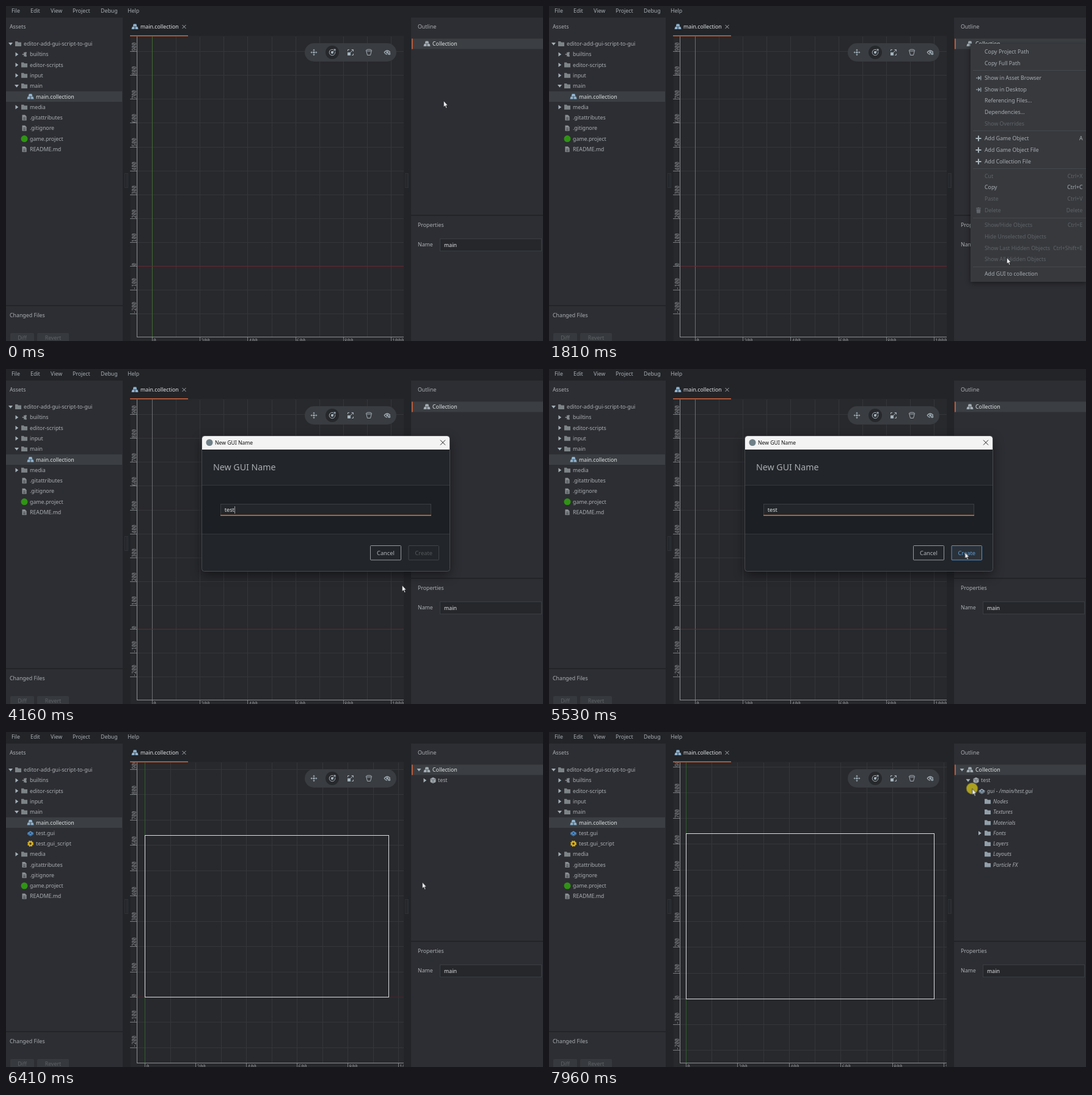
An HTML page for the animation above (8 s loop, 879 by 549 pixels).

```html
<!DOCTYPE html>
<html lang="en">
<head>
<meta charset="utf-8">
<title>Add GUI to collection</title>
<style>
@property --u { syntax: "<number>"; inherits: true; initial-value: 39.1; }
@property --x0 { syntax: "<number>"; inherits: true; initial-value: 239.5; }
@property --y0 { syntax: "<number>"; inherits: true; initial-value: 426.5; }
html, body { margin: 0; width: 100%; height: 100%; overflow: hidden; background: #222428; }
svg { display: block; width: 879px; height: 549px; }
text { font: 8.8px "Noto Sans", "Open Sans", sans-serif; fill: #a9aeb3; white-space: pre; }
.hi { fill: #e2e4e6; }
.off { fill: #606468; }
.it { font-style: italic; }
.mid { text-anchor: middle; }
.end { text-anchor: end; }
.line { fill: none; stroke: #a3afb7; }
.crisp { shape-rendering: crispEdges; }
.gx { transform: translateX(calc((var(--x0) + var(--u) * var(--n)) * 1px)); }
.gy { transform: translateY(calc((var(--y0) - var(--u) * var(--n)) * 1px)); }
.ruler text { font: 8px "Noto Sans Mono", "DejaVu Sans Mono", monospace; fill: #8d9094; }
#hover { mix-blend-mode: color-dodge; }
#bounds {
  x: calc(var(--x0) * 1px); y: calc((var(--y0) - var(--u) * 6.4) * 1px);
  width: calc(var(--u) * 9.6px); height: calc(var(--u) * 6.4px);
  fill: none; stroke: #dcdedf;
}
</style>
</head>
<body>
<svg id="stage" viewBox="0 0 879 549"></svg>
<script>
const LOOP = 8000;
let css = "";

// Registers keyframes [ms, declarations] on an element id.
function animate(id, keys, timing = "step-end") {
  const body = keys.map(([ms, rule]) => `${ms / LOOP * 100}% { ${rule} }`).join(" ");
  css += `@keyframes ${id} { ${body} }\n#${id} { animation: ${id} ${LOOP}ms ${timing} infinite; }\n`;
}

// Shows an element during each [from, to] span.
function show(id, ...spans) {
  const keys = spans.flatMap(([a, b]) => [[a, "visibility: visible"], [b, "visibility: hidden"]]);
  animate(id, [[0, "visibility: hidden"], ...keys.filter(k => k[0] < LOOP)]);
}

const rect = (x, y, w, h, fill, more = "") =>
  `<rect x="${x}" y="${y}" width="${w}" height="${h}" fill="${fill}" ${more}/>`;
const text = (x, y, s, cls = "") => `<text x="${x}" y="${y + 3.1}" class="${cls}">${s}</text>`;
const path = (d, fill, more = "") => `<path d="${d}" fill="${fill}" ${more}/>`;
const at = (x, y, s) => `<g transform="translate(${x} ${y})">${s}</g>`;
const group = (id, s) => `<g id="${id}">${s}</g>`;
const range = (a, b) => Array.from({ length: b - a + 1 }, (_, i) => a + i);
const row = i => 62 + i * 17.28;

const icon = {
  folder: (x, y, c = "#7d8488") => at(x, y, path("M-5-4h4l1 1.500h5v6.500h-10z", c)),
  stack: (x, y, c = "#8fb3cf") => at(x, y,
    path("M-2.300-4.500h4.600l1 4h-6.600zM-4.500 0h4l0 4h-5zM.500 0h4l1 4h-5z", c)),
  file: (x, y) => at(x, y, path("M-3.500-4.500h4.500l2.500 2.500v6.500h-7z", "#8b9195") +
    path("M-2-.500h4M-2 1.500h4M-2 3h4", "none", 'stroke="#2d2e33" stroke-width=".7"')),
  puzzle: (x, y) => at(x, y, `<g transform="rotate(45)">` + rect(-2.6, -2.6, 5.2, 5.2, "#868d91") +
    icon.dot(0, -3.4, 1.5, "#868d91") + icon.dot(3.4, 0, 1.5, "#868d91") +
    icon.dot(-2.4, 0, 1.1, "#2d2e33") + icon.dot(0, 2.4, 1.1, "#2d2e33") + "</g>"),
  dot: (x, y, r, c) => `<circle cx="${x}" cy="${y}" r="${r}" fill="${c}"/>`,
  gui: (x, y, c) => at(x, y, path("M-5.500 0L0-3.500 5.500 0 0 3.500z", c) +
    path("M-5 1.500L0 4.600 5 1.500", "none", `stroke="${c}"`) + path("M-1.800 0L0-1.200 1.800 0 0 1.200z", "#2d3a48")),
  gear: (x, y) => at(x, y, `<circle r="3.700" fill="none" stroke="#dcb520" stroke-width="2.600" stroke-dasharray="1.900 1"/>
    <circle r="2.700" fill="none" stroke="#dcb520" stroke-width="2"/>`),
  cube: (x, y) => at(x, y, path("M0-5L4.500-2.700V2.600L0 5-4.500 2.600V-2.700z", "#9da4a9") +
    path("M-4.300-2.600L0-.300 4.300-2.600M0-.300V5", "none", 'stroke="#5c6267" stroke-width=".8"')),
  right: (x, y) => at(x, y, path("M-2-3.500L2.700 0-2 3.500z", "#a3b1b8")),
  down: (x, y) => at(x, y, path("M-3.500-2h7L0 2.500z", "#a3b1b8")),
};

function assets() {
  const item = (i, x, pic, name, cls) => pic(x - 9, row(i)) + text(x, row(i), name, cls);
  const dir = (i, name, arrow = icon.right) => arrow(17.5, row(i)) + item(i, 39, icon.folder, name);
  const blueGui = (x, y) => icon.gui(x, y, "#4f8fce");
  const green = (x, y) => icon.dot(x, y, 5.5, "#2f9414");
  return rect(0, 140, 190, 17, "#3b3f43") +
    icon.down(7.5, row(0)) + item(0, 29, icon.folder, "editor-add-gui-script-to-gui") +
    icon.right(17.5, row(1)) + item(1, 39, icon.puzzle, "builtins") +
    dir(2, "editor-scripts") + dir(3, "input") + dir(4, "main", icon.down) +
    item(5, 49, icon.stack, "main.collection", "hi") +
    group("newFiles", item(6, 49, blueGui, "test.gui") + item(7, 49, icon.gear, "test.gui_script")) +
    group("lowerFiles", dir(6, "media") + item(7, 39, icon.file, ".gitattributes") +
      item(8, 39, icon.file, ".gitignore") + item(9, 39, green, "game.project") +
      item(10, 39, icon.file, "README.md"));
}

function panels() {
  const panel = (x, y, w, h) => rect(x, y, w, h, "#2d2e33");
  const grip = x => path(`M${x} 274.500h5v23h-5zM${x + 2.500} 275v22`, "none", 'stroke="#2f3237" class="crisp"');
  const menus = [[9, "File"], [40, "Edit"], [73, "View"], [109, "Project"], [155, "Debug"], [199, "Help"]];
  return panel(0, 19, 191, 471) + panel(0, 492, 191, 57) + panel(663, 19, 216, 323) + panel(663, 344, 216, 205) +
    menus.map(([x, s]) => text(x, 8, s)).join("") +
    text(6, 34, "Assets") + text(6, 507, "Changed Files") + text(674, 34, "Outline") + text(674, 359, "Properties") +
    rect(7, 536, 39, 16, "#36393d", 'rx="2"') + text(26.5, 544, "Diff", "mid off") +
    rect(51, 536, 52, 16, "#36393d", 'rx="2"') + text(77, 544, "Revert", "mid off") +
    text(674, 391, "Name") + rect(710.5, 381.5, 166, 20, "#25272b", 'stroke="#3a3d42"') + text(717, 392, "main", "hi") +
    icon.stack(211, 34) + text(220, 34, "main.collection", "hi") +
    path("M288.500 31l6 6m0-6l-6 6", "none", 'stroke="#a9adb2"') + grip(194.5) + grip(653.5);
}

function viewport() {
  const line = (cls, n, d, id, stroke) =>
    `<path ${id ? `id="${id}"` : ""} class="${cls} crisp" style="--n:${n}" d="${d}" stroke="${stroke}"/>`;
  const V = "M0 50V542", H = "M215 0H651";
  const xs = range(-1, 11).map(n => line("gx", n, V, "", "#34363a")).join("");
  const ys = range(-2, 10).map(n => line("gy", n, H, "", "#34363a")).join("");
  const left = range(-2, 10).map(n => `<g class="gy" style="--n:${n}"><path class="crisp" d="M203 0h11" stroke="#797c80"/>
    <text transform="translate(213 -.5) rotate(-90)">${n * 100}</text></g>`).join("");
  const base = range(0, 5).map(n => `<g class="gx" style="--n:${n * 2}"><path class="crisp" d="M0 542v7" stroke="#797c80"/>
    <text x="1.500" y="551.500">${n * 200}</text></g>`).join("");
  return `<clipPath id="area"><path d="M215 50H651V542H215z"/></clipPath>
    <clipPath id="side"><path d="M203 50H215V543H203z"/></clipPath>
    <clipPath id="foot"><path d="M203 542H651V549H203z"/></clipPath>` +
    rect(204, 49, 447, 500, "#28292d") + rect(203, 48, 95, 1.6, "#cb623b") +
    group("view", `<g clip-path="url(#area)">${xs}${ys}` +
      line("gx", 0, V, "axisY", "#6a6d70") + line("gy", 0, H, "axisX", "#662730") +
      `<rect id="bounds" class="crisp"/></g>
      <g class="ruler" clip-path="url(#side)">${left}</g><g class="ruler" clip-path="url(#foot)">${base}</g>`) +
    path("M214.500 50V542.500H651", "none", 'stroke="#8b8e91" class="crisp"');
}

function toolbar() {
  const c = "#a3b3bc";
  return rect(489, 61, 150, 30, "#393c40", 'rx="15"') + icon.dot(534, 76, 11, "#26282b") +
    at(504, 76, path("M0-5.500l1.800 2.300h-3.600zM0 5.500l1.800-2.300h-3.600zM-5.500 0l2.300-1.800v3.600zM5.500 0l-2.300-1.800v3.600z", c) +
      path("M0-3V3M-3 0H3", "none", `stroke="${c}" stroke-width=".8"`) + icon.dot(0, 0, 1.3, c)) +
    at(534, 76, `<path class="line" d="M2-4.300A4.800 4.800 0 1 0 4.500-1.500"/>` + icon.dot(0, 0, 2.2, c) +
      path("M0 0L4-4", "none", `stroke="${c}"`) + path("M2-5.500h3.500v3.500z", c)) +
    at(564, 76, rect(-5, 0, 5, 5, c) + `<path class="line" d="M-4.500-2v-2.500h2.500M4.500 2v2.500h-2.500M0 0L4-4M1.500-4.500h3v3"/>`) +
    at(594, 76, `<path class="line" d="M-4.500-3.500L-2.500 4.500H2.500L4.500-3.500"/><ellipse class="line" cy="-3.500" rx="4.500" ry="1.400"/>`) +
    at(624, 76, `<path class="line" stroke-width="1.300" d="M-5 0Q0-6 5 0M-5 0Q-3 3 0 3.300"/>` +
      icon.dot(0, 0, 1.7, c) + icon.dot(3.2, 2.3, 2, c) + icon.dot(3.2, 2.3, 0.7, "#393c40"));
}

function outline() {
  const kids = ["Nodes", "Textures", "Materials", "Fonts", "Layers", "Layouts", "Particle FX"];
  return rect(664, 53.5, 215, 17, "#3b3f43") + rect(664, 53.5, 1.7, 17, "#cf613a") +
    icon.stack(689, 62, "#a3adb4") + text(698, 62, "Collection", "hi") +
    group("object", icon.down(676, 62) + icon.cube(699, row(1)) + text(707, row(1), "test")) +
    group("closed", icon.right(685.5, row(1))) +
    group("opened", icon.down(686, row(1)) + icon.gui(708.5, row(2), "#8fa3b3") + text(717, row(2), "gui - /main/test.gui", "it")) +
    group("guiClosed", icon.right(696, row(2))) +
    group("guiNodes", icon.down(697, row(2)) + icon.right(705, row(6)) +
      kids.map((s, i) => icon.folder(718, row(i + 3), "#92a0aa") + text(727, row(i + 3), s, "it")).join(""));
}

function menu() {
  const arrow = y => at(703, y, `<path class="line" stroke-width="1.200" d="M-4 0H2M-.500-2.500L2 0-.500 2.500M3.800-3.500V3.500"/>`);
  const plus = y => at(703, y, path("M-4.500 0H4.500M0-4.500V4.500", "none", 'stroke="#a9b4bb" stroke-width="2"'));
  const bin = y => at(703, y, path("M-3.500-2.300h7l-.6 6.800h-5.800zM-4-4.200h2.500l.500-.800h2l.500.800h2.500v1.200h-8z", "#606468"));
  // y, label, shortcut, icon, disabled
  const items = [
    [75, "Copy Project Path"], [94, "Copy Full Path"],
    [118, "Show in Asset Browser", "", arrow], [137, "Show in Desktop", "", arrow],
    [155, "Referencing Files..."], [174, "Dependencies..."], [193, "Show Overrides", "", null, 1],
    [217, "Add Game Object", "A", plus], [236, "Add Game Object File", "", plus], [255, "Add Collection File", "", plus],
    [279, "Cut", "Ctrl+X", null, 1], [297, "Copy", "Ctrl+C"], [316, "Paste", "Ctrl+V", null, 1], [335, "Delete", "Delete", bin, 1],
    [359, "Show/Hide Objects", "Ctrl+E", null, 1], [378, "Hide Unselected Objects", "", null, 1],
    [397, "Show Last Hidden Objects", "Ctrl+Shift+E", null, 1], [415, "Show All Hidden Objects", "", null, 1],
    [439, "Add GUI to collection"],
  ];
  const rules = [105.5, 204.5, 266.5, 347.5, 427.5].map(y => `M694 ${y}H879`).join("");
  return group("menu", rect(690, 62, 190, 390, "#37393d", 'style="filter:drop-shadow(0 2px 4px #0007)"') +
    path(rules, "none", 'stroke="#45484c" class="crisp"') +
    items.map(([y, s, key, pic, off]) => {
      const cls = off ? "off" : "";
      return (pic ? pic(y) : "") + text(713, y, s, cls) + (key ? text(873.5, y, key, "end " + cls) : "");
    }).join("") + rect(693, -9, 186, 18, "#525252", 'id="hover"'));
}

function dialog() {
  const button = (x, w, s, stroke, fill, bg = "none") =>
    rect(x, 289.5, w, 23.5, bg, `rx="1" stroke="${stroke}"`) +
    `<text x="${x + w / 2}" y="304.500" class="mid" style="font-size:9.300px;fill:${fill}">${s}</text>`;
  const typed = [..."test"].map((c, i) => `<tspan id="key${i}">${c}</tspan>`).join("");
  return group("dialog",
    rect(320.5, 109.5, 406, 222, "#222529", 'rx="4" style="filter:drop-shadow(0 6px 9px #0007)"') +
    path("M321 132V114a4 4 0 0 1 4-4H722a4 4 0 0 1 4 4V132z", "#f3f3f3") +
    icon.dot(333, 120.5, 5.5, "#6f8088") + `<text x="342" y="124" style="font-size:8.600px;fill:#111">New GUI Name</text>` +
    path("M711 116.500l8 8m0-8l-8 8", "none", 'stroke="#222"') +
    rect(321, 190, 405, 81, "#1c1f23") + path("M321 190.500H726M321 270.500H726", "none", 'stroke="#34383c" class="crisp"') +
    rect(320.5, 109.5, 406, 222, "none", 'rx="4" stroke="#484b4f"') +
    `<text x="339" y="166" style="font-size:14.200px;font-weight:300">New GUI Name</text>` +
    rect(351.5, 221.5, 344, 18, "#23262a", 'stroke="#3b3e42"') + rect(351, 239, 345, 1.6, "#c87640") +
    `<text x="357.700" y="234" class="hi" style="font-size:9.200px">${typed}</text>` +
    rect(358, 225, 1, 12, "#9b9ea2", 'id="caret"') +
    button(596.5, 50, "Cancel", "#96999d", "#b3b7bc") +
    group("createOff", button(659, 49.5, "Create", "#414448", "#55585c")) +
    group("createOn", button(659, 49.5, "Create", "#4785bd", "#5b9fd8")) +
    group("createHover", button(659, 49.5, "Create", "#5596d0", "#5b9fd8", "#2b3138")));
}

const cursor = group("cursor", `<circle id="click" r="9.300" fill="#aca01f"/>` +
  path("M.300.300V10.800L2.700 8.600 4.300 12.400 6 11.700 4.400 8H7.300z", "#eceeef", 'stroke="#15171a" stroke-width=".7"'));

document.getElementById("stage").innerHTML = rect(0, 0, 879, 549, "#222428") +
  panels() + assets() + viewport() + toolbar() + outline() + menu() + dialog() + cursor;

const OPEN = 2400, CLOSE = 5850, ADDED = 6130, EXPAND = 7340, UNFOLD = 7940;
show("menu", [900, 2350]);
show("dialog", [OPEN, CLOSE]);
show("click", [820, 960], [2280, 2350], [5720, 5860], [7270, 7470], [UNFOLD, LOOP]);
show("newFiles", [ADDED, LOOP]);
show("object", [ADDED, LOOP]);
show("bounds", [ADDED, LOOP]);
show("closed", [ADDED, EXPAND]);
show("opened", [EXPAND, LOOP]);
show("guiClosed", [EXPAND, UNFOLD]);
show("guiNodes", [UNFOLD, LOOP]);
show("createOff", [OPEN, 4835]);
show("createOn", [4835, 5450]);
show("createHover", [5450, CLOSE]);
[3825, 3930, 4030, 4150].forEach((ms, i) => show("key" + i, [ms, CLOSE]));

const blink = (x, on) => `transform: translateX(${x}px); visibility: ${on ? "visible" : "hidden"}`;
animate("caret", [[0, blink(0, 0)], [OPEN, blink(0, 1)], [2885, blink(0, 0)], [3425, blink(0, 1)],
  [3825, blink(4, 1)], [3930, blink(9, 1)], [4030, blink(13, 1)], [4150, blink(16.5, 1)],
  [4705, blink(16.5, 0)], [5105, blink(16.5, 1)], [5500, blink(16.5, 0)]]);

animate("lowerFiles", [[0, "transform: none"], [ADDED, "transform: translateY(34.56px)"]]);
animate("hover", [[0, -50], [1235, 94], [1305, 118], [1375, 174], [1445, 217], [1515, 255], [1585, 297], [1655, -50], [1865, 439]]
  .map(([ms, y]) => [ms, `transform: translateY(${y}px)`]));
animate("axisY", [[0, "stroke: #3f6a2e"], [70, "stroke: #6a6d70"], [ADDED, "stroke: #2f5f2b"]]);
animate("axisX", [[0, "stroke: #662730"], [ADDED, "stroke: #551f27"], [6550, "stroke: #494c4f"]]);

animate("view", [[0, 39.1, 239.5, 426.5], [ADDED, 39.1, 239.5, 426.5], [6270, 40.4, 233.5, 431], [6410, 41.46, 228, 434.5],
  [6550, 41.95, 225.9, 436.2], [6750, 42.24, 224.5, 437.3], [LOOP, 42.24, 224.5, 437.3]]
  .map(([ms, u, x, y]) => [ms, `--u: ${u}; --x0: ${x}; --y0: ${y}`]), "linear");

animate("cursor", [[0, 716, 155], [60, 716, 155], [250, 709, 127], [480, 695, 80], [690, 689, 61], [1110, 689, 61],
  [1170, 696, 78], [1310, 722, 143], [1380, 731, 190], [1520, 742, 275], [1660, 747, 345], [1800, 749, 410],
  [1950, 749, 438], [2020, 750.5, 443.5], [2860, 750.5, 443.5], [2960, 722, 418], [3090, 660, 364], [3160, 648, 354],
  [5060, 648, 354], [5250, 662, 330], [5480, 680.5, 300], [6050, 680.5, 300], [6410, 681, 246], [6800, 684, 140],
  [7200, 684, 78], [7470, 684, 78], [7820, 692.5, 92.5], [LOOP, 692.5, 92.5]]
  .map(([ms, x, y]) => [ms, `transform: translate(${x}px, ${y}px)`]), "linear");

document.head.appendChild(document.createElement("style")).textContent = css;
</script>
</body>
</html>
```
